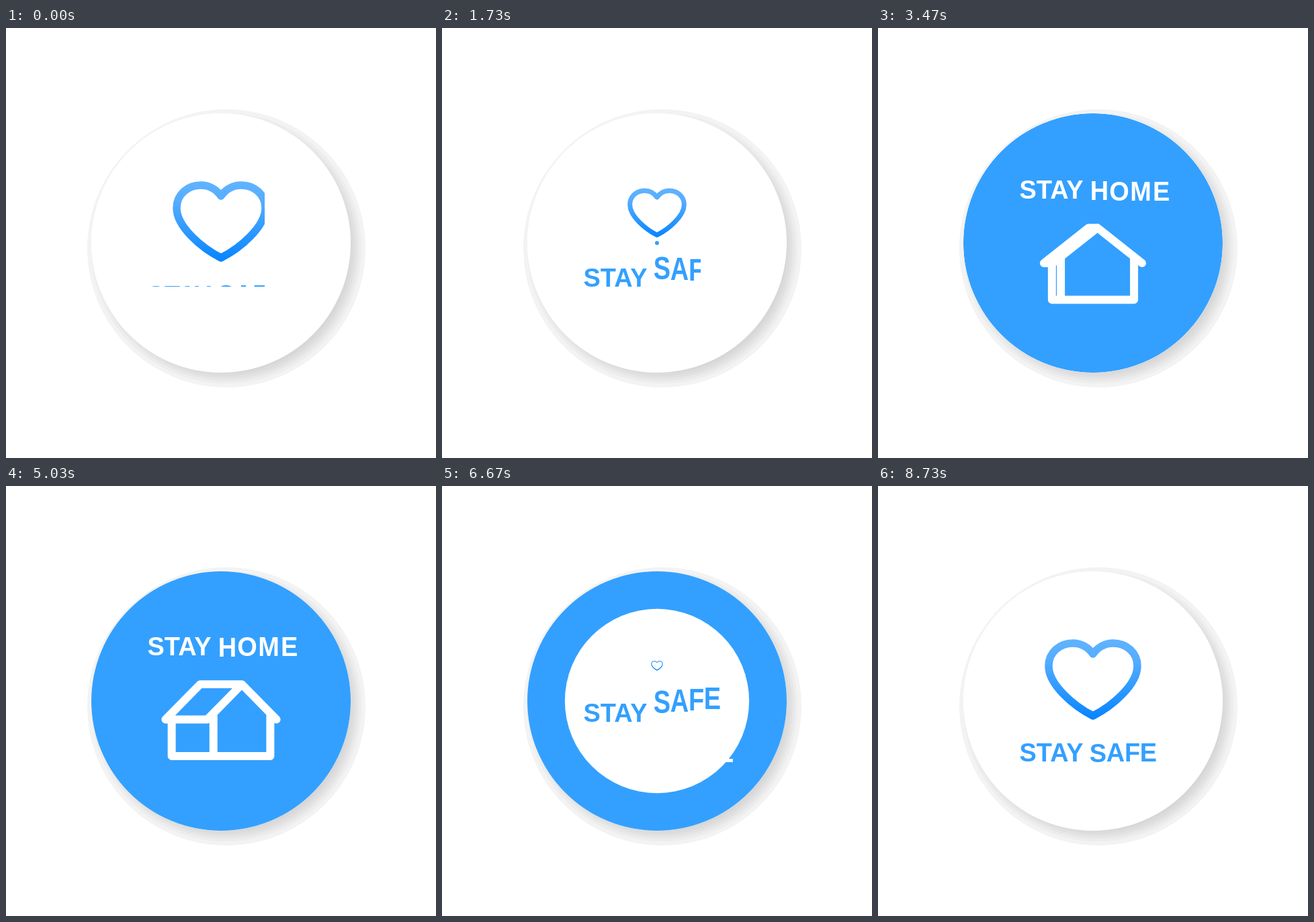
An HTML page with a canvas that plays this animation: 640 px wide and 640 px high, repeating every 8.76 s.

```html
<!DOCTYPE html>
<html>
<head>
<meta charset="utf-8">
<style>
html, body { margin: 0; width: 100%; height: 100%; overflow: hidden; background: #fff; }
canvas { display: block; }
</style>
</head>
<body>
<canvas id="stage" width="640" height="640"></canvas>
<script>
const ctx = document.getElementById('stage').getContext('2d');
const LOOP = 8760, HALF = LOOP / 2, R = 193, BLUE = '#33a0ff';
const SHADOW = [[207, '#f3f3f3'], [201, '#ededed'], [197, '#e7e7e7'],
                [193.5, '#e1e1e1'], [190, '#dcdcdc'], [186, '#d7d7d7']];
const SAFE = [['S', 327.5, .23], ['A', 353.5, .2], ['F', 378.5, .17], ['E', 402.4, .15]];
const HOME = [['H', 329.5, .1], ['O', 359, .1], ['M', 391.2, .1], ['E', 421.6, .1]];

const span = (t, a, b) => Math.min(1, Math.max(0, (t - a) / (b - a)));
const cubic = u => u < .5 ? 4 * u ** 3 : 1 - 4 * (1 - u) ** 3;

// Symmetric cubic-bezier(.84, 0, .16, 1)
function sharp(x) {
  let lo = 0, hi = 1;
  for (let i = 0; i < 30; i++) {
    const s = (lo + hi) / 2, q = 1 - s;
    if (3 * q * q * s * .84 + 3 * q * s * s * .16 + s ** 3 < x) lo = s; else hi = s;
  }
  return lo * lo * (3 - 2 * lo);
}

// 0 = "safe" pose, 1 = "home" pose
const rise = t => t < HALF ? sharp(span(t, 0, HALF)) : 1 - sharp(span(t, HALF, LOOP));

function disc(x, y, r, color) {
  ctx.beginPath();
  ctx.arc(x, y, r, 0, 7);
  ctx.fillStyle = color;
  ctx.fill();
}

function text(str, x, y, stretch, color, align) {
  ctx.save();
  ctx.translate(x, y);
  ctx.scale(1, 1.04 * stretch);
  ctx.font = 'bold 38px "Liberation Sans", Arial, sans-serif';
  ctx.textAlign = align;
  ctx.fillStyle = color;
  ctx.fillText(str, 0, 0);
  ctx.restore();
}

const stayY = t => 410.5 - 161 * rise(t);

// Earlier letters run slightly ahead of later ones
function word(letters, t, color, place) {
  text('STAY', 210.5, stayY(t), 1, color, 'left');
  letters.forEach(([ch, x, grow], i) => {
    const [y, away] = place(rise(Math.min(LOOP, t + 10 * (3 - i))));
    text(ch, x, y, 1 + grow * Math.min(1, 6 * away), color, 'center');
  });
}

function heart(t) {
  const q = t < HALF ? sharp(span(t, 0, 3600)) : 1 - sharp(span(t, 5458, LOOP));
  if (q > .999) return;
  ctx.save();
  ctx.translate(320, 288 - 40.8 * q + 19.8 * q * q);
  ctx.scale(1 - q, 1 - q);
  const shade = ctx.createLinearGradient(0, -60, 0, 60);
  shade.addColorStop(0, '#60b3ff');
  shade.addColorStop(.25, '#55adff');
  shade.addColorStop(1, '#0684ff');
  ctx.strokeStyle = shade;
  ctx.lineWidth = 11.5;
  ctx.lineJoin = 'round';
  ctx.beginPath();
  ctx.moveTo(0, -38);
  ctx.bezierCurveTo(-7, -48, -18, -54, -30, -54);
  ctx.bezierCurveTo(-50, -54, -66, -40, -66, -20);
  ctx.bezierCurveTo(-66, 8, -28, 40, 0, 54);
  ctx.bezierCurveTo(28, 40, 66, 8, 66, -20);
  ctx.bezierCurveTo(66, -40, 50, -54, 30, -54);
  ctx.bezierCurveTo(18, -54, 7, -48, 0, -38);
  ctx.closePath();
  ctx.stroke();
  ctx.restore();
}

function house(t) {
  const size = cubic(span(t, 1534, 3434)) * (1 - cubic(span(t, 4900, 6700)));
  if (size < .001) return;
  const left = Math.max(0, 6230 - t) / 1000;
  const yaw = (5.15 * left * left - 47) * Math.PI / 180;
  const front = -48.8 * Math.sin(yaw), back = -front, side = front > 0 ? -1 : 1;
  const wall = 55 * Math.cos(yaw), eave = 67 * Math.cos(yaw);
  const top = -53.5, brim = -1, sill = -10, base = 53.5;
  const line = (...pts) => {
    ctx.moveTo(pts[0], pts[1]);
    for (let i = 2; i < pts.length; i += 2) ctx.lineTo(pts[i], pts[i + 1]);
  };
  ctx.save();
  ctx.translate(320, stayY(t) + 97);
  ctx.scale(size, size);
  ctx.strokeStyle = '#fff';
  ctx.lineWidth = 12;
  ctx.lineJoin = ctx.lineCap = 'round';
  ctx.beginPath();
  line(front - eave, brim, front, top, front + eave, brim);
  line(front, top, back, top, back + side * eave, brim, front + side * eave, brim);
  line(front + side * wall, sill, front + side * wall, base);
  line(front - side * wall, sill, front - side * wall, base,
       back + side * wall, base, back + side * wall, brim);
  ctx.stroke();
  ctx.restore();
}

function safeScene(t) {
  disc(320, 320, R, '#fff');
  heart(t);
  word(SAFE, t, BLUE, p => [410.5 - 212 * p, p]);
}

function homeScene(t) {
  disc(320, 320, R, BLUE);
  word(HOME, t, '#fff', p => [250 + 255 * (1 - p), 1 - p]);
  house(t);
}

function draw(t) {
  ctx.fillStyle = '#fff';
  ctx.fillRect(0, 0, 640, 640);
  SHADOW.forEach(([r, color]) => disc(328, 328, r, color));
  disc(320, 320, R, '#fff');

  ctx.save();
  if (t < 1830) {
    ctx.beginPath();
    ctx.rect(0, 0, 385, 385);
    ctx.clip();
  }
  const up = t < HALF;
  const reveal = cubic(up ? span(t, 1438, 3296) : span(t, 5586, 7446));
  const [under, over] = up ? [safeScene, homeScene] : [homeScene, safeScene];
  if (reveal < 1) under(t);
  ctx.beginPath();
  ctx.arc(320, 320, R * reveal, 0, 7);
  ctx.clip();
  if (reveal > 0) over(t);
  ctx.restore();
}

const start = performance.now();
function tick() {
  draw((performance.now() - start) % LOOP);
  requestAnimationFrame(tick);
}
tick();
</script>
</body>
</html>
```
